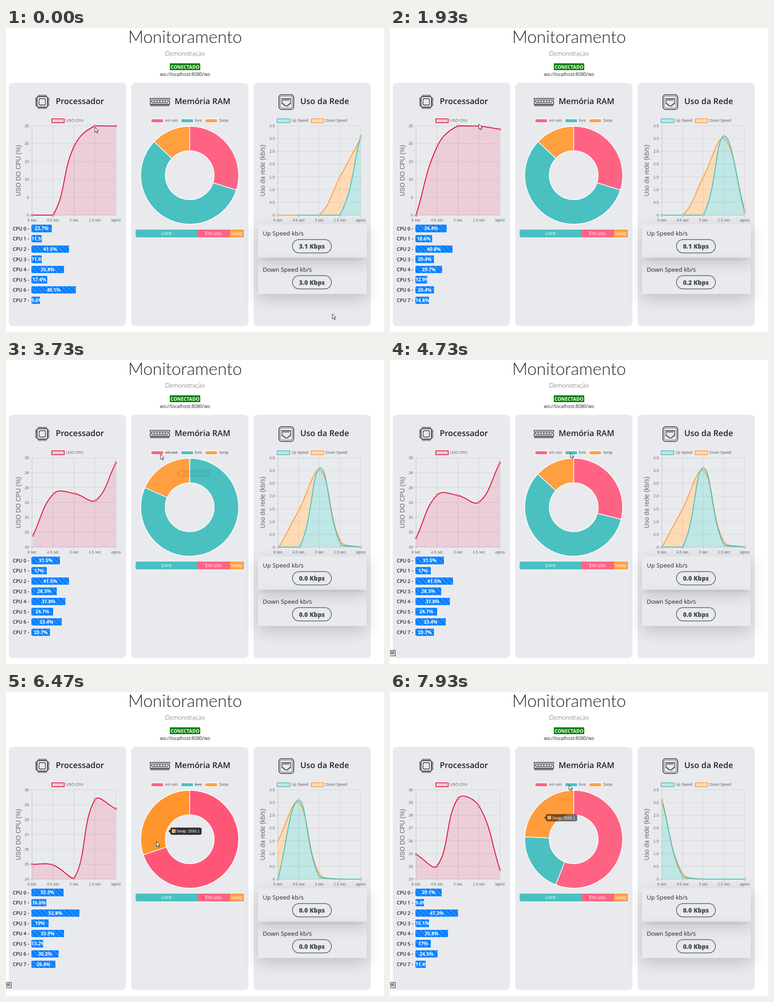
Recreate the animation shown at these times as an HTML page. Size 834 by 671 pixels, loop 8 s.

```html
<!DOCTYPE html>
<html lang="pt">
<head>
<meta charset="utf-8">
<title>Monitoramento</title>
<style>
html, body { margin: 0; width: 100%; height: 100%; overflow: hidden; background: #fff; }
#stage { position: absolute; left: 0; top: 0; width: 834px; height: 671px; overflow: hidden;
  font-family: "Open Sans", "Noto Sans", sans-serif; }
#stage div { position: absolute; box-sizing: border-box; }
.card { top: 121px; width: 259.5px; height: 537px; border-radius: 9px; background: #e9eaee; }
.speed { left: 556px; width: 240px; height: 74px; border-radius: 1px;
  box-shadow: 0 11px 34px rgba(0,0,0,.175); }
.bar { left: 56px; height: 16.6px; line-height: 16.4px; overflow: hidden; white-space: nowrap;
  text-align: center; color: #fff; font-size: 10.5px; font-weight: 700; border-radius: 3px 0 0 3px;
  background: linear-gradient(45deg, rgba(255,255,255,.15) 25%, transparent 25% 50%,
    rgba(255,255,255,.15) 50% 75%, transparent 75%) 0 0 / 11.25px 11.25px #007bff; }
svg { position: absolute; left: 0; top: 0; }
.title { font: 300 37.4px Lato, "Open Sans", sans-serif; fill: #212529; }
.subtitle { font: 300 14px Lato, "Open Sans", sans-serif; fill: #555; }
.status { font-size: 10.3px; font-weight: 700; fill: #fff; }
.address { font-size: 10.4px; fill: #212529; }
.chart { font-family: "Liberation Sans", Arial, sans-serif; font-size: 8.4px; fill: #666; }
.axis { font-size: 13.9px; }
.head { font-size: 18px; font-weight: 600; fill: #212529; }
.cpu { font-size: 10.6px; font-weight: 600; fill: #212529; }
.part { font-size: 10.4px; fill: #fff; }
.label { font-size: 13.4px; fill: #212529; }
.value { font-size: 13.5px; font-weight: 800; fill: #43494f; }
.badge { font-size: 8.5px; font-weight: 600; }
.icon { fill: none; stroke: #2b2b30; stroke-width: 1.3; }
</style>
</head>
<body>
<div id="stage">
  <div class="card" style="left:5.5px"></div>
  <div class="card" style="left:275.5px"></div>
  <div class="card" style="left:545.5px"></div>
  <div class="speed" style="top:433px"></div>
  <div class="speed" style="top:513px"></div>
  <svg id="svg" width="834" height="671" viewBox="0 0 834 671"></svg>
</div>
<script>
const stage = document.getElementById('stage'), svg = document.getElementById('svg');
const LOOP = 8000, PERIOD = 2010, FIRST_UPDATE = 1185;
const PINK = 'rgb(255,99,132)', TEAL = 'rgb(75,192,192)', ORANGE = 'rgb(255,159,64)';
const CRIMSON = '#dc143c', ROSE = '#ebced7', MINT = '#bfe7e5', PEACH = '#fddbb7';

function el(tag, attrs = {}, parent = svg, text) {
  const node = document.createElementNS('http://www.w3.org/2000/svg', tag);
  for (const key in attrs) node.setAttribute(key, attrs[key]);
  if (text !== undefined) node.textContent = text;
  return parent.appendChild(node);
}
const label = (x, y, text, cls, anchor = 'start', parent = svg) =>
  el('text', { x, y, class: cls, 'text-anchor': anchor }, parent, text);
const rect = (x, y, width, height, fill, extra = {}, parent = svg) =>
  el('rect', { x, y, width, height, fill, ...extra }, parent);
const path = (d, extra = {}, parent = svg) => el('path', { d, ...extra }, parent);
const place = (node, [x, y]) => node.setAttribute('transform', `translate(${x} ${y})`);

const clamp = (v, lo = 0, hi = 1) => Math.min(hi, Math.max(lo, v));
const lerp = (a, b, p) => a + (b - a) * p;
const lerpAll = (a, b, p) => a.map((v, i) => lerp(v, b[i], p));
const sum = list => list.reduce((a, b) => a + b);
const quart = p => 1 - (1 - clamp(p)) ** 4;
const smooth = p => { p = clamp(p); return p * p * (3 - 2 * p); };
// quick appearance, then a slow fade like the chart animation
const fade = (t, show, hide) => smooth((t - show) / 150) * (1 - quart((t - hide) / 1000));

// CSS "ease"
function cssEase(p) {
  const bez = (a, b, s) => 3 * a * s * (1 - s) ** 2 + 3 * b * s * s * (1 - s) + s ** 3;
  let lo = 0, hi = 1;
  for (let i = 0; i < 20; i++) {
    const mid = (lo + hi) / 2;
    if (bez(.25, .25, mid) < clamp(p)) lo = mid; else hi = mid;
  }
  return bez(.1, 1, lo);
}

// Header
label(395, 33, 'Monitoramento', 'title', 'middle');
label(395, 61, 'Demonstração', 'subtitle', 'middle');
rect(361.5, 78, 67, 15, '#008000');
label(395, 89.5, 'CONECTADO', 'status', 'middle');
label(395, 106, 'ws://localhost:8080/ws', 'address', 'middle');
label(163, 168, 'Processador', 'head', 'middle');
label(433.5, 168, 'Memória RAM', 'head', 'middle');
label(703, 168, 'Uso da Rede', 'head', 'middle');

// Icons
const icon = el('g', { class: 'icon' });
rect(68.5, 151.5, 23, 23, 'none', { rx: 2.5, 'stroke-width': 1.6 }, icon);
rect(73, 156, 14, 14, 'none', { rx: 2 }, icon);
path('M71 149.3H90 M71 176.7H90 M66.3 154V173 M93.7 154V173',
  { 'stroke-width': 3.4, 'stroke-dasharray': '1.6 1.7' }, icon);
path('M318 155.5H361V159A2 2 0 0 0 361 163V168.5H318V163A2 2 0 0 0 318 159Z', {}, icon);
for (let i = 0; i < 6; i++) rect(322 + i * 6.1, 158.5, 4, 7, 'none', { 'stroke-width': 1 }, icon);
path('M319 170.8H360', { 'stroke-width': 4, 'stroke-dasharray': '1.6 1.4' }, icon);
rect(602.2, 147.2, 32.6, 32.6, 'none', { rx: 6, 'stroke-width': 1.6 }, icon);
rect(605.2, 150.2, 26.6, 26.6, 'none', { rx: 4, 'stroke-width': .8 }, icon);
path('M609 156H628V167H625V169.5H622V172H615V169.5H612V167H609Z', {}, icon);
path('M611.5 158.7H626', { 'stroke-width': 4, 'stroke-dasharray': '1.2 1.7' }, icon);

// Readings of each core per update; the chart shows their mean
const CORES = [
  [22.7, 11.5, 41.5, 11.6, 35.8, 17.4, 49.1, 9.6],
  [34.4, 18.6, 40.8, 20.4, 29.7, 12.9, 20.4, 14.8],
  [31.5, 17, 41.5, 28.3, 37.8, 24.1, 33.4, 20.7],
  [35.3, 16.6, 52.8, 19, 35.9, 13.2, 30.2, 26.4],
  [29.1, 9.4, 47.2, 15.1, 35.8, 17, 24.5, 11.4]
];
const CPU = [0, 0, 19.2, 25, ...CORES.map(row => sum(row) / row.length + .05)];
const UP = [null, 0, 0, 0, 3.1, .1, 0, 0, 0];
const DOWN = [0, 0, 0, 1.5, 3, .2, 0, 0, 0];
const TOP = 216, BOTTOM = 413;

function legend(x, text, border, fill, textX) {
  rect(x, 200.5, 27.5, 8.4, fill, { stroke: border, 'stroke-width': 1.6 });
  return label(textX, 207.2, text, 'chart');
}

// Axis range with a round step of 1, 2 or 5
function niceScale(values) {
  const min = Math.min(...values), max = Math.max(...values), raw = (max - min) / 6;
  const power = 10 ** Math.floor(Math.log10(raw)), f = raw / power;
  const step = power * (f < 1.5 ? 1 : f < 3 ? 2 : f < 7 ? 5 : 10);
  return { min: Math.floor(min / step) * step, max: Math.ceil(max / step) * step, step };
}

function lineChart({ left, right, title, titleX, series }) {
  const gap = (right - left) / 4;
  const fills = series.map(s => path('', { fill: s.fill }));
  const grid = el('g');
  const lines = series.map(s => path('', { fill: 'none', stroke: s.color, 'stroke-width': 2 }));
  const dots = series.map(s => Array.from({ length: 5 }, () =>
    el('circle', { r: 2.1, fill: s.fill, stroke: s.color, 'stroke-width': 1 })));
  ['6 sec', '4.5 sec', '3 sec', '1.5 sec', 'agora'].forEach((text, i) =>
    label(left + i * gap, 427, text, 'chart', 'middle'));
  place(el('g'), [0, 0]);
  el('text', { class: 'chart axis', 'text-anchor': 'middle',
    transform: `translate(${titleX} 314.5) rotate(-90)` }, svg, title);

  const scale = k => niceScale(series.flatMap(s => s.data.slice(k, k + 5)).filter(v => v !== null));
  const height = (v, { min, max }) => lerp(BOTTOM, TOP, (v - min) / (max - min));

  // each node: x, y, incoming control, outgoing control
  function nodes(data, k) {
    const range = scale(k);
    const pts = data.slice(k, k + 5).map((v, i) => v === null ? null : [left + i * gap, height(v, range)]);
    return pts.map((c, i) => {
      if (!c) return null;
      const a = pts[i - 1] || c, b = pts[i + 1] || c;
      const da = Math.hypot(c[0] - a[0], c[1] - a[1]), db = Math.hypot(b[0] - c[0], b[1] - c[1]);
      const control = f => [clamp(c[0] + f * (b[0] - a[0]), left, right), clamp(c[1] + f * (b[1] - a[1]), TOP, BOTTOM)];
      return [...c, ...control(-.4 * da / (da + db)), ...control(.4 * db / (da + db))];
    });
  }

  function drawGrid(k) {
    const range = scale(k);
    grid.textContent = '';
    let d = `M${left} ${TOP}V419M${left - 6} ${BOTTOM}H${right}`;
    for (let i = 0; i < 5; i++) d += `M${left + i * gap} ${TOP}V419`;
    for (let v = range.min; v <= range.max + .01; v += range.step) {
      const y = height(v, range);
      d += `M${left - 6} ${y}H${right}`;
      label(left - 7, y + 3, v ? v.toFixed(range.step < 1 ? 1 : 0) : '0', 'chart', 'end', grid);
    }
    path(d, { stroke: 'rgba(0,0,0,.1)', 'stroke-width': .9, fill: 'none' }, grid);
  }

  let shown = -1;
  return (k, e) => {
    if (k !== shown) drawGrid(shown = k);
    series.forEach((s, n) => {
      const before = k && nodes(s.data, k - 1);
      const view = nodes(s.data, k).map((p, i) =>
        p && lerpAll(before && before[i + 1] || p, p, e));
      const live = view.filter(Boolean);
      const d = live.map((p, i) => i
        ? `C${live[i - 1].slice(4)} ${p.slice(2, 4)} ${p.slice(0, 2)}` : `M${p.slice(0, 2)}`).join('');
      lines[n].setAttribute('d', d);
      fills[n].setAttribute('d', `${d}V${BOTTOM}H${live[0][0]}Z`);
      dots[n].forEach((dot, i) => {
        dot.style.display = view[i] ? '' : 'none';
        if (view[i]) place(dot, view[i]);
      });
    });
  };
}

legend(101, 'USO CPU', CRIMSON, ROSE, 132.5);
legend(598.5, 'Up Speed', TEAL, MINT, 630);
legend(673.5, 'Down Speed', ORANGE, PEACH, 705);
const drawCpu = lineChart({
  left: 57.5, right: 242.5, title: 'USO DO CPU (%)', titleX: 32,
  series: [{ data: CPU, color: CRIMSON, fill: ROSE }]
});
const drawNet = lineChart({
  left: 600, right: 782.5, title: 'Uso da rede (kb/s)', titleX: 571,
  series: [{ data: DOWN, color: ORANGE, fill: PEACH }, { data: UP, color: TEAL, fill: MINT }]
});

// Core bars with drifting stripes, still for the first moments
const bars = CORES[0].map((_, i) => {
  const y = 442.6 + i * 22.6;
  label(15, y + 4.2, `CPU ${i} -`, 'cpu');
  const bar = document.createElement('div');
  bar.className = 'bar';
  bar.style.top = y - 8.3 + 'px';
  return stage.insertBefore(bar, svg);
});
function drawBars(t, k, e) {
  const drift = -11.25 * ((Math.max(t, 870) - 530) / 1000 % 1);
  bars.forEach((bar, i) => {
    bar.style.width = 2 * lerp(CORES[Math.max(0, k - 1)][i], CORES[k][i], e) + 'px';
    bar.style.backgroundPosition = drift + 'px 0';
    bar.textContent = CORES[k][i] + '%';
  });
}

// Speed boxes
const speeds = ['Up', 'Down'].map((name, i) => {
  const dy = i * 79.5;
  label(566.5, 458.3 + dy, name + ' Speed kb/s', 'label');
  rect(632, 467 + dy, 86, 29.5, 'none', { rx: 14.7, stroke: '#555b61', 'stroke-width': 1.5 });
  return label(675, 487 + dy, '', 'value', 'middle');
});

// Memory
const usedLegend = legend(320, 'em uso', '#fff', PINK, 351.5);
const freeLegend = legend(386, 'livre', '#fff', TEAL, 416.5);
legend(439, 'Swap', '#fff', ORANGE, 470);
rect(286, 445, 239, 17, TEAL, { rx: 3 });
rect(422, 445, 72, 17, PINK);
path('M494 445H522a3 3 0 0 1 3 3V459a3 3 0 0 1 -3 3H494Z', { fill: ORANGE });
label(354, 457.3, 'Livre', 'part', 'middle');
label(457.5, 457.3, 'Em uso', 'part', 'middle');
label(509, 457.3, 'Swap', 'part', 'middle');

const MEMORY = { used: 5903.4, free: 11280, swap: 2550.1 };
const TOGGLES = [
  { at: -LOOP }, { at: 2950, off: 'used' }, { at: 4150 }, { at: 5060, off: 'free' }, { at: 7830 }
];
function shares(off) {
  const shown = Object.keys(MEMORY).map(key => key === off ? 0 : MEMORY[key]);
  return shown.map(v => v / sum(shown));
}
const arcs = [PINK, TEAL, ORANGE].map(fill =>
  path('', { fill, stroke: '#fff', 'stroke-width': 1.5, 'stroke-linejoin': 'bevel' }));

function ring(a, b) {
  const at = (r, turn) => {
    const w = turn * 2 * Math.PI;
    return `${405.3 + r * Math.sin(w)} ${325 - r * Math.cos(w)}`;
  };
  const big = b - a > .5 ? 1 : 0;
  return `M${at(108, a)}A108 108 0 ${big} 1 ${at(108, b)}L${at(54, b)}A54 54 0 ${big} 0 ${at(54, a)}Z`;
}

function drawMemory(t) {
  const n = TOGGLES.filter(s => s.at <= t).length - 1, { at, off } = TOGGLES[n];
  const before = n ? TOGGLES[n - 1].off : off;
  const sizes = lerpAll(shares(before), shares(off), quart((t - at) / 1000));
  let start = 0;
  arcs.forEach((arc, i) => {
    arc.setAttribute('d', sizes[i] > .001 ? ring(start, start + sizes[i]) : '');
    start += sizes[i];
  });
  const usedHover = fade(t, 5400, 6470), swapHover = fade(t, 6330, 7600);
  arcs[0].setAttribute('fill', `rgb(255,${99 - 13 * usedHover},${132 - 12 * usedHover})`);
  arcs[2].setAttribute('fill', `rgb(255,${159 - 9 * swapHover},${64 - 19 * swapHover})`);
  usedLegend.style.textDecoration = off === 'used' ? 'line-through' : 'none';
  freeLegend.style.textDecoration = off === 'free' ? 'line-through' : 'none';
}

// Tooltips, with the caret tip at the local origin
function tooltip(shape, x, y, swatch, text, title) {
  const g = el('g', { class: 'chart' });
  path(shape, { fill: 'rgba(0,0,0,.8)' }, g);
  rect(x, y - 6.7, 7, 7, swatch, { stroke: '#fff', 'stroke-width': .7 }, g);
  label(x + 9.5, y, text, '', 'start', g).style.fill = '#fff';
  if (title) label(x, y - 12, title, '', 'start', g).style.cssText = 'fill:#fff;font-weight:700';
  return (at, opacity) => {
    place(g, at);
    g.setAttribute('opacity', opacity);
  };
}
const box = (x, y, w, h) => `M${x + 4} ${y}h${w - 8}a4 4 0 0 1 4 4v${h - 8}a4 4 0 0 1 -4 4h${8 - w}a4 4 0 0 1 -4 -4v${8 - h}a4 4 0 0 1 4 -4Z`;
const cpuTip = tooltip(box(-34, 4, 69, 29) + 'M-4 4L0 0L4 4Z', -30, 27, ROSE, 'USO CPU: 25', '1.5 sec');
const swapTip = tooltip(box(4, -8, 69, 16) + 'M4 -4L0 0L4 4Z', 8, 3, ORANGE, 'Swap: 2550.1');
const usedTip = tooltip(box(-78, -8, 74, 16) + 'M-4 -4L0 0L-4 4Z', -74, 3, PINK, 'em uso: 5903.4');

function drawTips(t) {
  cpuTip([196, 217], fade(t, 900, 1185));
  usedTip([485, 335], fade(t, 5060, 5200));
  if (t < 5000) swapTip([376, 250.5], fade(t, 2950, 3250));
  else swapTip(lerpAll([374, 332], [340, 277.5], smooth((t - 6330) / 300)), fade(t, 6330, 7830));
}

// Frame-edge label and cursors
const badge = el('g');
rect(-10, 641, 21.5, 12, '#fff', { stroke: '#000', 'stroke-width': 1 }, badge);
label(-.5, 650, '09', 'badge', 'start', badge);

const pointer = () => path('M0 0V11.2L2.6 8.8L4.5 13L6.3 12.2L4.5 8.2H8Z',
  { fill: '#fff', stroke: '#111', 'stroke-width': .9 });
const cursor = pointer(), trail = pointer();
// arrival time, x, y; every trip takes the same time
const STOPS = [
  [0, 196, 219], [1200, 196, 212], [2500, 341, 208], [4700, 398, 205],
  [5530, 391, 366], [6450, 332, 330], [7750, 395, 205]
];
const cursorAt = t => STOPS.reduce((at, [time, ...to]) =>
  lerpAll(at, to, smooth((t - time) / 380 + 1)), STOPS[0].slice(1));

function draw(t) {
  const k = Math.max(0, Math.ceil((t - FIRST_UPDATE) / PERIOD));
  const since = k ? t - FIRST_UPDATE - (k - 1) * PERIOD : LOOP;
  const e = quart(since / 1000);
  drawCpu(k, e);
  drawNet(k, e);
  drawBars(t, k, cssEase((since - 20) / 600));
  drawMemory(t);
  drawTips(t);
  [UP, DOWN].forEach((data, i) => speeds[i].textContent = data[k + 4].toFixed(1) + ' Kbps');
  badge.style.display = t >= 4600 ? '' : 'none';
  place(cursor, cursorAt(t));
  trail.style.display = t < 200 ? '' : 'none';
  place(trail, lerpAll([720, 631], [192, 588], clamp((t - 69) / 71)));
}

const begin = performance.now();
function tick() {
  draw((performance.now() - begin) % LOOP);
  requestAnimationFrame(tick);
}
tick();
</script>
</body>
</html>
```
